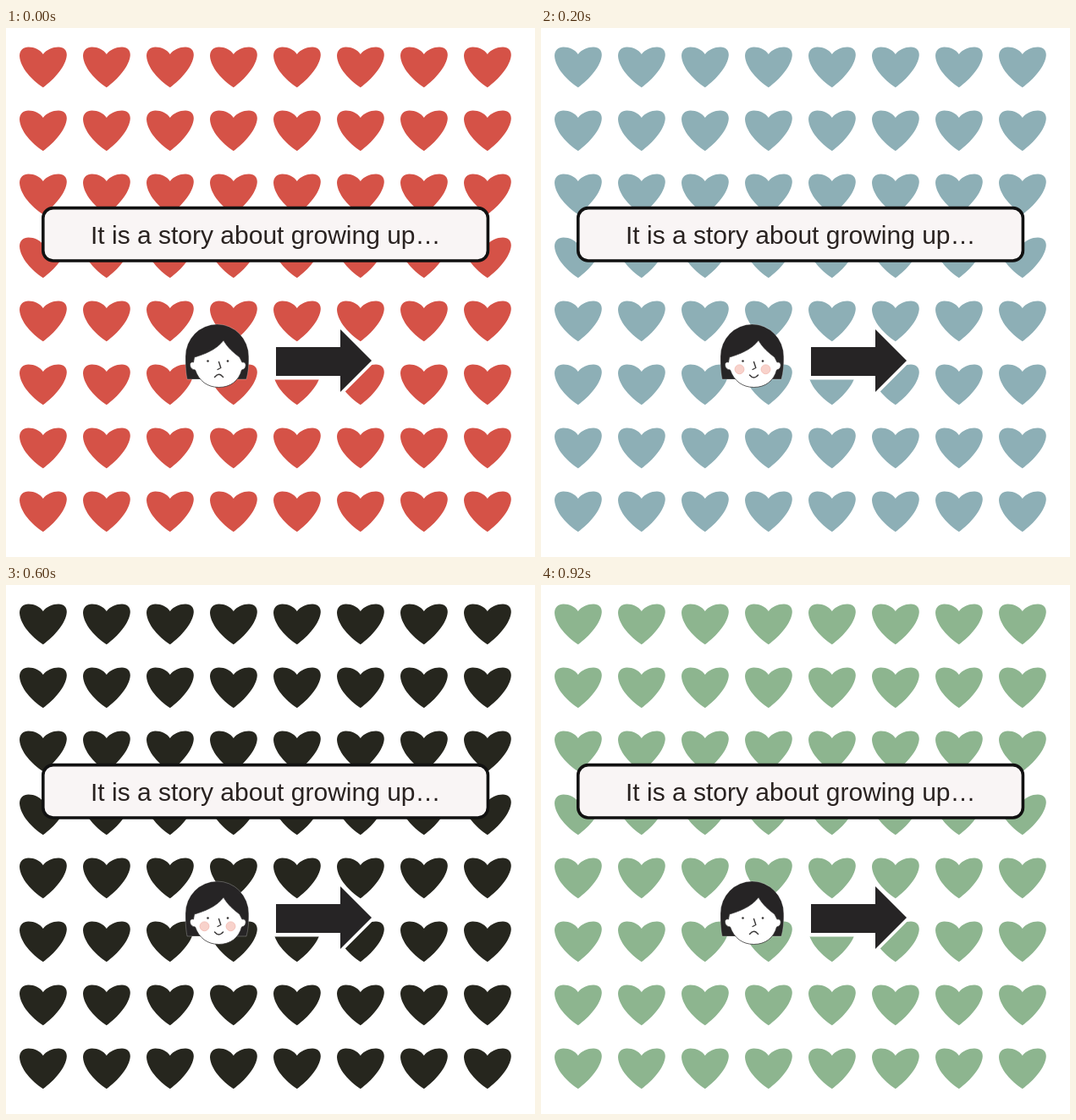
Write an HTML page that moves like this. It is 625 px wide and 625 px high and loops after 1 s.

```html
<!DOCTYPE html>
<html lang="en">
<head>
<meta charset="utf-8">
<title>Growing up</title>
<style>
  html, body { margin: 0; width: 100%; height: 100%; overflow: hidden; background: #fff; }
  svg { display: block; width: 100%; height: 100%; }
  text { font: 30px "Liberation Sans", Arial, sans-serif; fill: #292220; }
  .line { fill: none; stroke: #383636; stroke-width: 1.4; stroke-linecap: round; stroke-linejoin: round; }
</style>
</head>
<body>
<svg viewBox="0 0 625 625">
  <defs>
    <pattern id="hearts" width="75" height="75" patternUnits="userSpaceOnUse">
      <path id="heart" d="M43.8 31C48 25.5 55 22.5 62 22.5C68.5 22.5 72 26.5 71.8 32C71 45 57.3 60.5 43.8 70.3C30.5 61.5 16.8 47 16 33C16 26.5 20.5 22.5 26.5 22.5C34 22.5 40 25.5 43.8 31Z"/>
    </pattern>
    <path id="arrow" d="M319 377H395V356L432 393L395 430V411H319Z"/>
  </defs>
  <rect width="600" height="600" fill="url(#hearts)"/>

  <rect x="43.8" y="212.6" width="525.6" height="62.4" rx="12" fill="#f9f5f5" stroke="#111" stroke-width="3.6"/>
  <text x="100" y="255">It is a story about growing up…</text>

  <path d="M214 415C212 404 212 396 212 388A37.4 38 0 0 1 286.8 388C287 397 286.500 406 284 415Z" fill="#262425" stroke="#fff" stroke-opacity=".25"/>
  <path d="M257 369C249 379.500 236 385 222.500 389L221.500 395C215.500 393 216 403.500 223.500 404C228 417 238 424.500 251.500 424.500C265 424.500 275 417 278.500 404C285 403 284.500 393.500 279 395L276 389C269.500 384 262 378 257 369Z" fill="#fff" stroke="#383636" stroke-width=".8"/>
  <g id="cheeks" fill="#f8d2cb" stroke="#f4c0b8">
    <circle cx="234.5" cy="403.3" r="5.4"/>
    <circle cx="265.5" cy="403.3" r="5.4"/>
  </g>
  <circle cx="238.5" cy="393.5" r="1.3" fill="#383636"/>
  <circle cx="262" cy="393.5" r="1.3" fill="#383636"/>
  <path class="line" d="M251.5 394.5L253.8 401.5L250 403.5"/>
  <path class="line" id="mouth"/>

  <use href="#arrow" x="-.5" y="1.5" fill="#fff" stroke="#fff" stroke-width="6"/>
  <use href="#arrow" fill="#262425"/>
</svg>
<script>
  const colors = ["#d55247", "#8dafb6", "#f5ba5b", "#26261e", "#8db58f"];
  const [heart, cheeks, mouth] = ["heart", "cheeks", "mouth"].map(id => document.getElementById(id));
  const start = performance.now();

  function draw(now) {
    const step = Math.floor(Math.max(0, now - start) / 200) % colors.length;
    const happy = step % 2 === 1;
    heart.setAttribute("fill", colors[step]);
    cheeks.setAttribute("visibility", happy ? "visible" : "hidden");
    mouth.setAttribute("d", happy ? "M246.5 410Q251.5 416 256.5 410" : "M246.5 412.5Q251.5 406 256.5 412.5");
    requestAnimationFrame(draw);
  }
  draw(start);
</script>
</body>
</html>
```
